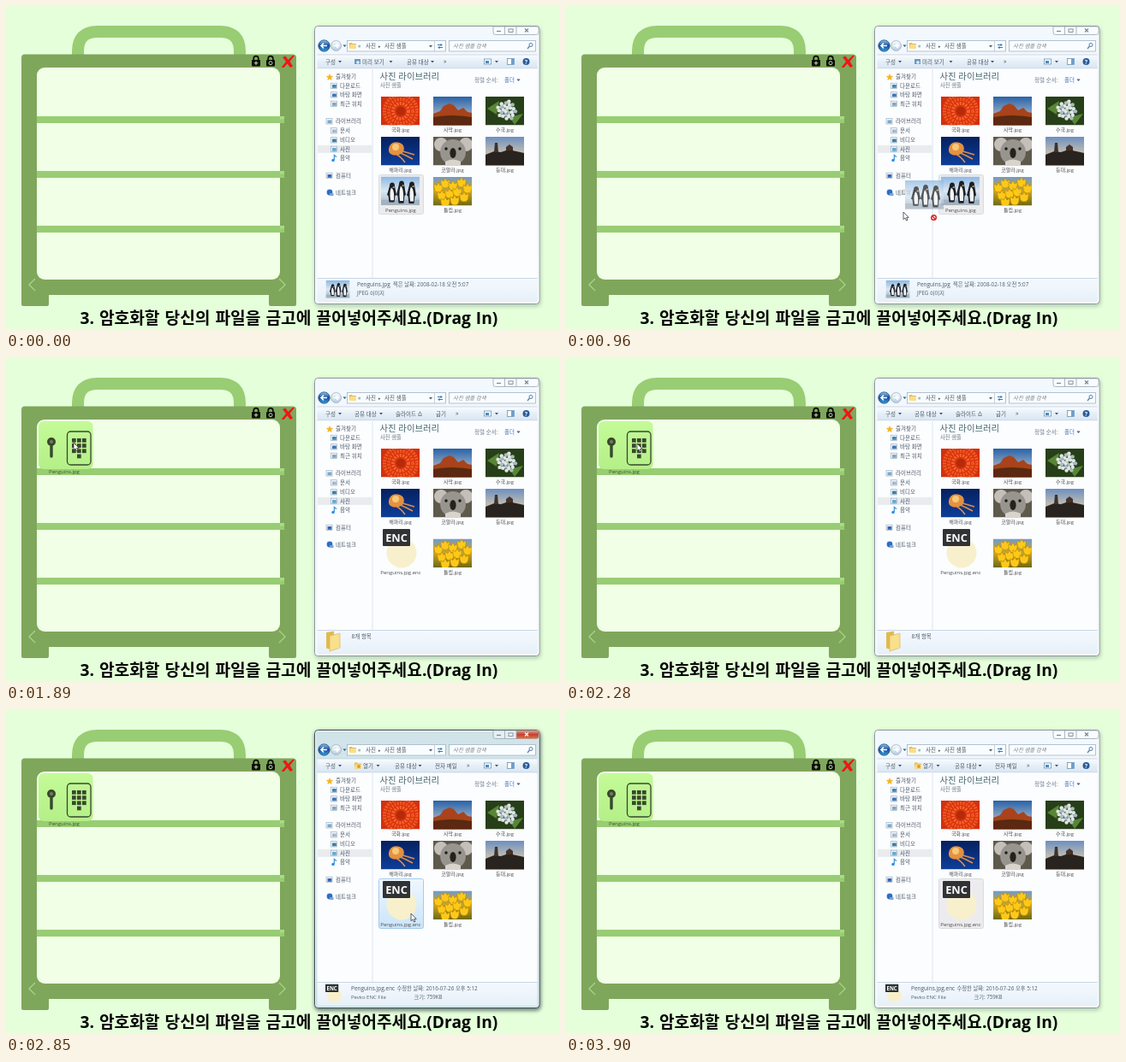
An HTML page that plays this animation: 647 by 379 pixels, repeating every 3.93 s.

```html
<!DOCTYPE html>
<html lang="ko">
<head>
<meta charset="utf-8">
<style>
html, body { margin: 0; width: 100%; height: 100%; overflow: hidden; background: #e6ffdb; }
svg { display: block; }
text { font-family: "Open Sans", "Noto Sans CJK KR", "Noto Sans CJK", sans-serif; white-space: pre; }
</style>
</head>
<body>
<svg id="stage" width="647" height="379" viewBox="0 0 647 379"></svg>
<script>
const LOOP = 3930, STEP = 30;
const stage = document.getElementById('stage');

const rect = (x, y, w, h, fill, more = '') =>
  `<rect x="${x}" y="${y}" width="${w}" height="${h}" fill="${fill}" ${more}/>`;
const circle = (x, y, r, fill, more = '') => `<circle cx="${x}" cy="${y}" r="${r}" fill="${fill}" ${more}/>`;
const path = (d, fill, more = '') => `<path d="${d}" fill="${fill}" ${more}/>`;
const line = (d, color, width = 1, more = '') => path(d, 'none', `stroke="${color}" stroke-width="${width}" ${more}`);
const text = (x, y, s, size = 6.5, fill = '#4a5866', more = '') =>
  `<text x="${x}" y="${y}" font-size="${size}" fill="${fill}" ${more}>${s}</text>`;
const label = (x, y, s) => text(x, y, s, 6, '#4c4c4c', 'text-anchor="middle"');
const caret = (x, y = 64) => path(`M${x - 2} ${y}h4l-2 2.4z`, '#3b5878');
const use = (id, x, y, w = 45, h = 33.5, more = '') =>
  `<use href="#${id}" x="${x}" y="${y}" width="${w}" height="${h}" ${more}/>`;
const during = (from, to, body) => `<g data-from="${from}" data-to="${to}">${body}</g>`;
const gradient = (id, ...colors) => `<linearGradient id="${id}" x2="0" y2="1">${colors.map((c, i) =>
  `<stop offset="${i / (colors.length - 1)}" stop-color="${c}"/>`).join('')}</linearGradient>`;
const photo = (id, back, body) =>
  `<symbol id="${id}" viewBox="0 0 45 33.5" preserveAspectRatio="none">${rect(0, 0, 45, 33.5, back)}${body}</symbol>`;

const petals = (r, color) => circle(23, 17, r, 'none', `stroke="${color}" stroke-width="4" stroke-dasharray="2.2 1.2"`);
const penguin = (x, y, h) =>
  path(`M${x} ${y}q3 0 3 4l2 ${h * .5}l-1.5 1l-1 ${h * .35}h-6l-1 ${-h * .35}l-1.5 -1l3 ${-h * .5}q0 -4 3 -4z`, '#1b2029') +
  path(`M${x - 1} ${y + 6}q4 3 3 ${h * .7}h-4q-1.5 ${-h * .5} 1 ${-h * .7}z`, '#f4f4f0') +
  path(`M${x + 2} ${y + 4}l1 2l-3 .5z`, '#e8b23c');
const tulip = (x, y) => path(`M${x - 5} ${y - 5}l3 2l2 -4l2 4l3 -2q1 10 -5 10t-5 -10z`, '#fcc91a', 'stroke="#b98400" stroke-width=".6"');
const blooms = Array.from({ length: 26 }, (_, i) => {
  const r = 2.2 * Math.sqrt(i), a = i * 2.4;
  return circle(25 + r * Math.cos(a), 16 + r * Math.sin(a), 2.2, i % 3 ? '#dfe6e4' : '#a9bac6');
}).join('');

const defs = `<defs>
  ${gradient('glass', '#f3f9fe', '#e9f1f9', '#f4f9fd')}
  ${gradient('activeGlass', '#cfe3e9', '#dceef3', '#c0dbe3')}
  ${gradient('bar', '#fafdff', '#e6eff8', '#d9e6f2')}
  ${gradient('foot', '#f4f9fe', '#e7f0f8')}
  ${gradient('blue', '#8fc2ec', '#174f9e', '#3aa0df')}
  ${gradient('pale', '#f8fcff', '#b5cbdc')}
  ${gradient('red', '#e5a08c', '#c4402b', '#d97a50')}
  ${gradient('pick', '#eef7fe', '#cbe4fa')}
  ${gradient('tileFill', '#c4fb98', '#b5ef88')}
  ${gradient('desertSky', '#2b62a6', '#7f9dc0', '#e8a35c')}
  ${gradient('sea', '#06205f', '#0d3f9a')}
  ${gradient('dusk', '#6d8fc0', '#b9b9b4', '#f0a94c')}
  ${gradient('ice', '#8db8e2', '#dbe7f1', '#9fb9cf')}
  ${gradient('spring', '#6f9bd0', '#c9a52a', '#6d6a12')}
  ${photo('flower', '#d4300e', petals(19, '#ee5a22') + petals(14, '#f1551c') + petals(9, '#f4642a') + circle(23, 17, 5, '#b52a08'))}
  ${photo('desert', 'url(#desertSky)', path('M0 20L8 17L12 11L19 8L24 10L29 16L35 13L40 18L45 19V34H0z', '#a8431b') + path('M0 24q20 -4 45 0v10H0z', '#5b2811'))}
  ${photo('hydrangea', '#263f18', path('M2 14l14 -9l-3 16zM28 24l16 -4l-10 13z', '#578634') + blooms)}
  ${photo('jelly', 'url(#sea)', path('M9 14q2 -10 13 -7q7 3 4 11q-6 5 -13 3q-5 -2 -4 -7z', '#e5923f') + circle(17, 12, 4, '#f7c77a') + line('M22 16q7 2 17 5M20 18q8 3 17 8M17 20q6 3 11 10', '#df8b47', 1.6))}
  ${photo('koala', '#5d594c', circle(9, 9, 8, '#c4c0b9') + circle(38, 9, 8, '#c4c0b9') + `<ellipse cx="23" cy="18" rx="15" ry="15" fill="#98948e"/>` + `<ellipse cx="23" cy="19" rx="3.6" ry="6" fill="#24211f"/>` + circle(15, 14, 1.7, '#1f1611') + circle(31, 14, 1.7, '#1f1611') + path('M14 29q9 -5 18 0v5H14z', '#d8d4cd'))}
  ${photo('lighthouse', 'url(#dusk)', path('M0 21l10 -4l8 1l9 -3l18 4v15H0z', '#29231f') + path('M10 18l1 -11h3l1 11z', '#3d322c') + path('M24 16v-4l4 -3l4 3v4z', '#463229'))}
  ${photo('penguins', 'url(#ice)', rect(0, 27, 45, 7, '#a3b2bf') + penguin(13, 7, 21) + penguin(24, 5, 25) + penguin(36, 6, 24))}
  ${photo('tulips', 'url(#spring)', [[6, 13], [14, 8], [23, 11], [33, 7], [40, 14], [10, 22], [19, 20], [28, 18], [36, 24], [25, 28], [14, 30]].map(p => tulip(...p)).join(''))}
  <symbol id="enc" viewBox="0 0 42 48">${circle(23, 28, 17.5, '#f8f0cc')}${rect(1, 0, 32, 20, '#303234', 'rx="1"')}${text(17, 14.6, 'ENC', 12.8, '#fff', 'font-weight="bold" text-anchor="middle"')}</symbol>
  <filter id="blur" x="-10%" y="-10%" width="120%" height="120%"><feGaussianBlur stdDeviation="2"/></filter>
</defs>`;

const shelf = y => rect(36, y, 289, 8, '#98cd73') + path(`M320 ${y}h5v3l-5 1z`, '#aada89');
const padlock = (x, mark) => rect(x, 63, 10, 7.5, '#0b0d08', 'rx="1"') +
  line(`M${x + 2.2} 63v-1.5a2.8 2.8 0 0 1 5.6 0v1.5`, '#0b0d08', 1.7) + mark;
const safe =
  line('M84 61V53Q84 30 107 30H250Q273 30 273 53V61', '#98cd73', 14) +
  path('M22 56.5H335q4 0 4 4V349q0 2 -2 2H309q-2 0 -2 -2V338H50V349q0 2 -2 2H20q-2 0 -2 -2V60.5q0 -4 4 -4z', '#7fa75b') +
  rect(36, 72, 284, 248, '#f0ffe6', 'rx="9"') +
  [129, 193, 257].map(shelf).join('') +
  line('M34 319l-7 7l7 7M319 319l7 7l-7 7', '#a5d784', 1.2) +
  padlock(287, line('M292 64.5v4.5M289.8 66.7h4.5', '#c0dfa5', 1.1)) +
  padlock(304, circle(309, 66.7, 2, 'none', 'stroke="#c0dfa5"')) +
  path('M323 60l3.5 -1.5l3 4.5l5 -5h2.5l-5.5 7l3.5 5.5l-3 1.5l-3.5 -4.5l-4 4.5h-3l5.5 -7z', '#f01515');

const keys = [0, 1, 2, 3, 4, 5, 6, 7, 8, 10].map(i =>
  rect(77 + i % 3 * 6, 94 + (i / 3 | 0) * 6.2, 4.7, 4.7, '#39472f')).join('');
const tile = rect(38, 74, 63.5, 56, 'url(#tileFill)', 'rx="6"') +
  circle(53, 98, 5, '#39472f') + line('M53 99V115', '#39472f', 3.4, 'stroke-linecap="round"') + circle(53, 98, 2, '#6d815b') +
  rect(71.5, 86, 27.5, 39, 'none', 'rx="4" stroke="#39472f" stroke-width="1.3"') + keys +
  text(68, 134.5, 'Penguins.jpg', 6, '#3c5528', 'text-anchor="middle"');

const frame = (fill, edge, close) =>
  rect(360.5, 23.5, 262.5, 325, fill, `rx="4" stroke="${edge}"`) +
  rect(361.5, 24.5, 260.5, 323, 'none', 'rx="3" stroke="#fff" stroke-opacity=".7"') +
  path('M569 24v7q0 2.5 2.5 2.5h48q2.5 0 2.5 -2.5v-7z', '#fff', 'fill-opacity=".4" stroke="#9aa8b3" stroke-width=".8"') +
  (close ? path('M596 24h26v7q0 2.5 -2.5 2.5H596z', 'url(#red)') : '') +
  line('M582.5 24v9.5M596 24v9.5', '#9aa8b3', .8) +
  line('M573 29.5h5', '#7c8791', 1.2) + rect(587, 27, 5, 3.5, '#fff', 'stroke="#7c8791" stroke-width=".9"') +
  line('M606 26.5l4 4m0 -4l-4 4', close ? '#fff' : '#7c8791', 1.2);

const folder = (x, y) => `<g transform="translate(${x} ${y})">${path('M0 0h3l1 1h4v6H0z', '#e5bd55')}${path('M1 2h7v5H0z', '#f8df8a')}</g>`;
const openFolder = path('M374 321l9 -1.5v22l-9 -2z', '#e2b950') + path('M378 325l12 -3v17l-12 4z', '#f8e08d', 'stroke="#d9b14a" stroke-width=".6"');
const chrome =
  circle(385.5, 46.5, 6, 'url(#pale)', 'stroke="#9db0bf" stroke-width=".8"') +
  circle(371.5, 46.5, 6.7, 'url(#blue)', 'stroke="#24527f" stroke-width=".8"') +
  line('M375 46.5h-7m3 -3l-3 3l3 3', '#fff', 1.6) + line('M382.5 46.5h6m-2.5 -2.5l2.5 2.5l-2.5 2.5', '#fff', 1.4) + caret(395.5, 45.5) +
  rect(398.5, 40.5, 115, 12.5, '#fafdff', 'stroke="#a5b4c1" stroke-width=".8"') +
  rect(517.5, 40.5, 101, 12.5, '#fafdff', 'stroke="#a5b4c1" stroke-width=".8"') +
  folder(401, 43) + text(411, 48.8, '«', 6.5) + text(420, 49, '사진') + text(435, 49, '▸', 5) + text(442, 49, '사진 샘플') + caret(496, 46) +
  line('M500.5 41v12', '#b8c5d0', .8) + line('M504 45.5h5m-1.5 -1.5l1.5 1.5l-1.5 1.5M510 48.5h-5m1.5 -1.5l-1.5 1.5l1.5 1.5', '#2b78b9') +
  text(522, 49, '사진 샘플 검색', 6.4, '#7b858d', 'font-style="italic"') +
  circle(613, 45.5, 2, 'none', 'stroke="#567ca0"') + line('M611.5 47l-2.5 3', '#567ca0', 1.2) +
  rect(363.5, 57, 257, 16, 'url(#bar)') + line('M363.5 57h257M363.5 73h257', '#bccbd9', .7) +
  rect(363.5, 73.4, 257, 245, '#fcfdff') + line('M428 74v244', '#d3dee8', .8) +
  rect(363.5, 318, 257, 28, 'url(#foot)') + line('M363.5 318.5h257', '#c0cfdd', .8) +
  text(373, 67.6, '구성') + caret(390) +
  rect(558.5, 62, 8, 6, '#fff', 'stroke="#7092b4" stroke-width=".8"') + rect(560, 64, 4, 3, '#4d8dc2') + caret(573) +
  rect(585.5, 61.5, 8, 7, '#fff', 'stroke="#7092b4" stroke-width=".8"') + rect(590, 62, 3, 6, '#68a0d0') +
  circle(607.5, 65, 4, '#285b9c') + text(607.5, 67.6, '?', 7, '#fff', 'font-weight="bold" text-anchor="middle"') +
  text(436.5, 86, '사진 라이브러리', 10.4, '#45666e') + text(437, 94.5, '사진 샘플', 6.3, '#6c7a84') +
  text(547, 89, '정렬 순서:', 6.5, '#6b7d96') + text(582, 89, '폴더', 6.5, '#3b74c6') + caret(598.5, 85.5);

const nav = [
  [83, '즐겨찾기', '#f3b52c', 1], [93.5, '다운로드', '#4187bd'], [104, '바탕 화면', '#3878bb'], [114.5, '최근 위치', '#8ba4ba'],
  [135, '라이브러리', '#78a9d0', 1], [146, '문서', '#a6b7c8'], [157, '비디오', '#387fa8'], [167.5, '사진', '#61a8d6'], [178, '음악', '#2c94e0'],
  [198.5, '컴퓨터', '#3c64a8', 1], [219, '네트워크', '#2971c5', 1]
].map(([y, name, color, top]) => {
  const x = top ? 374 : 379.5;
  const icon = name === '즐겨찾기' ? path('M378 79l1.2 2.7l3 .3l-2.2 2l.7 3l-2.7 -1.6l-2.7 1.6l.7 -3l-2.2 -2l3 -.3z', color)
    : name === '음악' ? circle(382, 180.5, 1.8, color) + line('M383.3 180v-5.5l2.7 2', color, 1.2)
    : name === '네트워크' ? circle(378, 218, 3.4, color) + rect(378, 219, 4.5, 3, '#7ba7d4')
    : rect(x, y - 3.3, 7, 6.3, '#f3f7fa', 'stroke="#8fa5b8" stroke-width=".6"') + rect(x + 1.5, y - 1.5, 4.8, 3.8, color);
  return icon + text(top ? 385 : 390, y + 2.4, name);
}).join('');

const file = (id, col, y, name) => use(id, 438 + col * 61, y) + label(460.5 + col * 61, y + 41, name + '.jpg');
const files = [
  ['flower', 0, 106, '국화'], ['desert', 1, 106, '사막'], ['hydrangea', 2, 106, '수국'],
  ['jelly', 0, 153, '해파리'], ['koala', 1, 153, '코알라'], ['lighthouse', 2, 153, '등대']
].map(f => file(...f)).join('');

const mark = (h, fill, edge) => rect(435.5, 197.5, 52, h, fill, `rx="2" stroke="${edge}" stroke-width=".8"`);
const grayMark = h => mark(h, '#ececee', '#d4d6d8');
const blueMark = h => mark(h, 'url(#pick)', '#91c0e8');
const shadow = opacity => rect(360, 24, 265, 328, '#3f5356', `rx="6" opacity="${opacity}" filter="url(#blur)"`);
const inactive = shadow(.25) + frame('url(#glass)', '#8a969b');

const explorer =
  during(0, 2850, inactive) + during(2850, 3900, shadow(.7) + frame('url(#activeGlass)', '#414d53', true)) + during(3900, LOOP, inactive) +
  chrome + rect(364, 162.8, 63, 9, '#e9ebee') + nav + files +
  during(0, 1890,
    text(416, 67.6, '미리 보기') + rect(407, 62, 7, 6, '#6a9bc5') + circle(411, 66, 1.8, '#e4f0f8') + caret(449.5) +
    text(468, 67.6, '공유 대상') + caret(498) + text(511, 67.3, '»', 7) +
    during(0, 690, grayMark(46)) + during(690, 870, blueMark(46)) + during(870, 1890, grayMark(46)) +
    use('penguins', 438, 199.6) + label(461, 241.3, 'Penguins.jpg') + file('tulips', 1, 200, '튤립') +
    use('penguins', 373.5, 321, 28, 20.5) + text(410, 328.3, 'Penguins.jpg') +
    text(452, 328.3, '찍은 날짜: 2008-02-18 오전 5:07', 6.3, '#53606d') + text(410, 338, 'JPEG 이미지', 6.2, '#53606d')) +
  during(1890, 2850, text(407, 67.6, '공유 대상') + caret(438) + text(455, 67.6, '슬라이드 쇼') + text(502, 67.6, '굽기') + text(525, 67.3, '»', 7)) +
  during(1890, 2790, openFolder + text(403.5, 328.3, '8개 항목')) +
  during(2850, LOOP, folder(407, 61.5) + circle(412, 66, 2, '#e79a28') + text(417, 67.6, '열기') + caret(434.5) +
    text(454, 67.6, '공유 대상') + caret(483.5) + text(501, 67.6, '전자 메일') + text(538, 67.3, '»', 7)) +
  during(2640, 3900, blueMark(58)) + during(3900, LOOP, grayMark(58)) +
  during(1890, LOOP, use('enc', 439, 200, 42, 48) + label(461, 253, 'Penguins.jpg.enc') + file('tulips', 1, 211.5, '튤립')) +
  during(2790, LOOP, use('enc', 372.5, 320.5, 20, 23) + text(403, 328.3, 'Penguins.jpg.enc') +
    text(456.5, 328.3, '수정한 날짜: 2016-07-26 오후 5:12', 6.3, '#53606d') +
    text(403, 338, 'Pevko ENC File', 6, '#53606d') + text(476.5, 338, '크기: 759KB', 6.2, '#53606d'));

const pointer = `<g id="pointer">
  ${during(840, 1350, use('penguins', 2, -37, 45, 33.5, 'opacity=".75"'))}
  ${during(840, 1110, circle(35.5, 6.5, 2.8, '#fff', 'stroke="#d32020" stroke-width="1.4"') + line('M33.5 4.5l4 4', '#d32020', 1.3))}
  ${path('M0 0V8.6L2 6.9L3.5 10L5 9.3L3.6 6.4H6.2z', '#fff', 'stroke="#222" stroke-width=".7"')}
</g>`;

const caption = text(86.5, 371.8, '3. 암호화할 당신의 파일을 금고에 끌어넣어주세요.(Drag In)', 19.2, '#050805', 'font-weight="700" word-spacing="1"');

stage.innerHTML = defs + safe + during(1350, LOOP, tile) + explorer + caption + pointer;

// Pointer stops: time, x, y
const stops = [
  [420, 641, 297], [720, 462, 221], [810, 460, 220], [960, 394, 241], [1080, 310, 246], [1350, 79, 99],
  [2250, 79, 99], [2280, 83, 100], [2610, 489, 237], [2760, 473, 238], [3090, 473, 238],
  [3150, 468, 241], [3270, 468, 241], [3420, 620, 198], [3450, 655, 190]
];
const pointerNode = document.getElementById('pointer');
const timed = [...stage.querySelectorAll('[data-from]')].map(node => [node, +node.dataset.from, +node.dataset.to]);
const show = (node, on) => { node.style.display = on ? '' : 'none'; };
const start = performance.now();

function draw() {
  const t = Math.floor((performance.now() - start) % LOOP / STEP) * STEP;
  for (const [node, from, to] of timed) show(node, t >= from && t < to);
  show(pointerNode, t >= 420 && t < 3450);
  const i = stops.findIndex(s => s[0] > t);
  if (i > 0) {
    const [t0, x0, y0] = stops[i - 1], [t1, x1, y1] = stops[i];
    const k = (t - t0) / (t1 - t0);
    const p = t1 - t0 > 200 ? k * k * (3 - 2 * k) : k;
    pointerNode.setAttribute('transform', `translate(${x0 + (x1 - x0) * p} ${y0 + (y1 - y0) * p})`);
  }
  requestAnimationFrame(draw);
}
draw();
</script>
</body>
</html>
```
